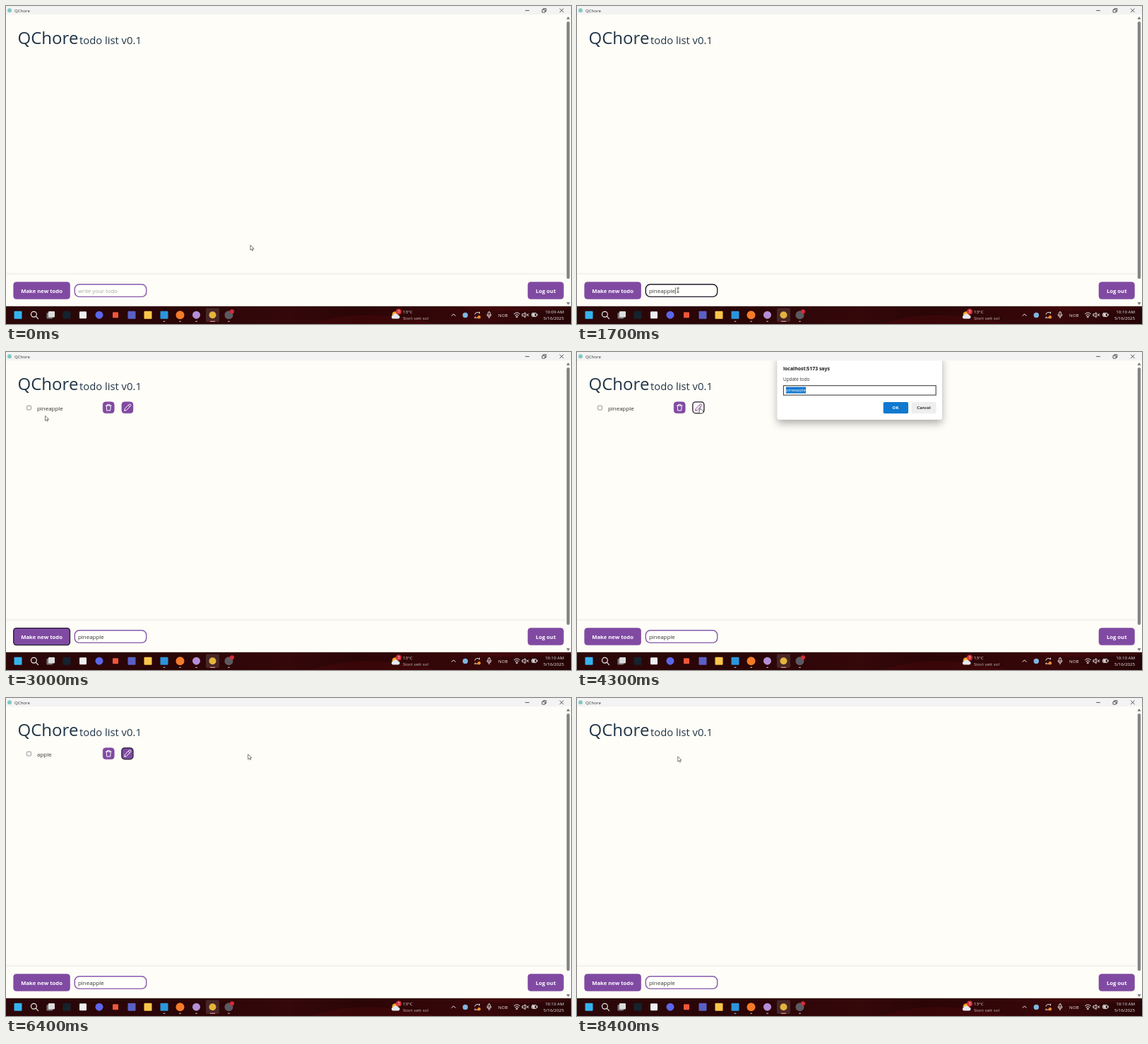
Animation of 800x451 px, one loop 8500 ms. Source, as an HTML page:

```html
<!DOCTYPE html>
<html lang="en">
<head>
<meta charset="utf-8">
<title>QChore</title>
<style>
html, body { margin: 0; width: 100%; height: 100%; overflow: hidden; background: #fefdf7; }
svg { display: block; width: 100%; height: 100%; }
text { font-family: "Open Sans", "Noto Sans", sans-serif; fill: #333; white-space: pre; }
.b { font-weight: 700; }
.mid { text-anchor: middle; }
.bar text { fill: #f2eaea; font-size: 6.15px; }
.end { text-anchor: end; }
.line { fill: none; stroke-linecap: round; stroke-linejoin: round; }
</style>
</head>
<body>
<svg viewBox="0 0 800 451">
  <defs>
    <linearGradient id="wall">
      <stop offset="0" stop-color="#2c0709"/>
      <stop offset=".3" stop-color="#2a0506"/>
      <stop offset=".5" stop-color="#35080a"/>
      <stop offset=".62" stop-color="#2b0506"/>
      <stop offset=".85" stop-color="#380709"/>
      <stop offset="1" stop-color="#240506"/>
    </linearGradient>
    <filter id="shade" x="-20%" y="-20%" width="140%" height="160%">
      <feDropShadow dx="0" dy="5" stdDeviation="6" flood-opacity=".32"/>
    </filter>
    <clipPath id="page"><rect y="12" width="800" height="414"/></clipPath>
  </defs>

  <rect width="800" height="451" fill="#fefdf7"/>

  <!-- page -->
  <text x="16.5" y="54.3" font-size="24" style="fill:#213547">QChore</text>
  <text x="104" y="54.3" font-size="14.8" style="fill:#213547">todo list v0.1</text>

  <g id="item">
    <rect id="box" x="29.6" y="76.2" width="5.8" height="5.8" rx="1" stroke-width=".8"/>
    <path id="tick" class="line" d="M31 79.2l1.2 1.3 2-2.7" stroke="#fff" stroke-width=".9"/>
    <text id="label" x="44" y="82.5" font-size="7.95"></text>
    <g id="trash">
      <rect x="137.2" y="70.8" width="16" height="16" rx="4"/>
      <path class="line" d="M141.3 76h7.8M143.6 76v-1.6h3.2v1.6M142.2 76l.5 7h5l.5-7" stroke-width="1"/>
    </g>
    <g id="edit">
      <rect x="163.9" y="70.8" width="16" height="16" rx="4"/>
      <path class="line" d="M167.8 83l.6-2.8 6-6q1.1-.7 2 .2t.2 2l-6 6zM173.2 75.4l2.2 2.2" stroke-width="1"/>
    </g>
  </g>

  <!-- footer -->
  <path d="M0 380.2h793" stroke="#eeede8" stroke-width="1.2"/>
  <path d="M0 379h793" stroke="#f8f7f1" stroke-width="1.4"/>
  <g id="make">
    <rect x="10.7" y="391.6" width="79.8" height="24" rx="4"/>
    <text class="b mid" x="50.6" y="406.6" font-size="7.7">Make new todo</text>
  </g>
  <g id="out">
    <rect x="739" y="391.6" width="50.4" height="24" rx="4"/>
    <text class="b mid" x="764.2" y="406.6" font-size="7.7">Log out</text>
  </g>
  <rect id="field" x="97.3" y="394.8" width="101.4" height="17.6" rx="6.5" fill="#fffffc" stroke-width="1.4"/>
  <text id="typed" x="102" y="406.6" font-size="7.95"></text>
  <path id="caret" stroke="#222" stroke-width=".7"/>

  <!-- scrollbar -->
  <rect x="792.5" y="12" width="7.5" height="414" fill="#fcfcf9"/>
  <rect x="793.8" y="22" width="4.4" height="365" rx="2.2" fill="#858585"/>
  <path d="M793.4 18.8l2.6-3.8 2.6 3.8zM793.4 420.2l2.6 3.8 2.6-3.8z" fill="#777"/>

  <!-- prompt -->
  <g id="prompt" clip-path="url(#page)">
    <rect x="283.7" y="4" width="233.2" height="92" rx="4" fill="#fff" filter="url(#shade)"/>
    <text class="b" x="292" y="26.2" font-size="6.9" style="fill:#1a1a1a">localhost:5173 says</text>
    <text x="292" y="41.2" font-size="6.4">Update todo</text>
    <rect x="292.4" y="47.7" width="215.8" height="13.4" fill="#fff" stroke="#444" stroke-width="1.1"/>
    <rect id="mark" x="295.8" y="49.6" width="28.2" height="9" fill="#1478d0"/>
    <text id="answer" x="296" y="56.4" font-size="6"></text>
    <path id="caret2" stroke="#111" stroke-width=".7"/>
    <rect x="433.7" y="71" width="35.4" height="16.3" rx="2" fill="#0f79cf"/>
    <text class="b mid" x="451" y="81.3" font-size="6" style="fill:#fff">OK</text>
    <rect x="473.5" y="71" width="35.2" height="16.3" rx="2" fill="#eeeeee"/>
    <text class="b mid" x="491" y="81.3" font-size="5.9">Cancel</text>
  </g>

  <!-- title bar -->
  <rect width="800" height="12.3" fill="#f3f3f3"/>
  <circle cx="5" cy="6.2" r="2.9" fill="#7fc8c4"/>
  <text x="12" y="8.7" font-size="6.1">QChore</text>
  <path class="line" d="M735.5 6.4h5M759.4 5.2h3.8v3.8h-3.8zM760.8 5v-1.4h4v4h-1.4M784.2 3.8l5 5M789.2 3.8l-5 5" stroke="#333" stroke-width=".8"/>

  <!-- taskbar -->
  <g class="bar">
    <rect y="425.8" width="800" height="25.2" fill="url(#wall)"/>
    <path d="M430 451q50-16 100-12t80 12zM640 426q70 12 160 3v-3z" fill="#5a0d10" opacity=".3"/>
    <rect x="283" y="428.6" width="19" height="19.4" rx="2" fill="#fff" opacity=".13"/>
    <g id="apps"></g>
    <g class="line" stroke="#eee" stroke-width="1.2">
      <circle cx="39.4" cy="437.2" r="3.9"/><path d="M42.3 440.2l3.2 3.4"/>
    </g>
    <rect x="57.5" y="435" width="8.5" height="8.5" rx="1" fill="#777"/>
    <rect x="60" y="433" width="9" height="8.6" rx="1" fill="#ddd"/>
    <circle cx="320" cy="433.3" r="3" fill="#d92b35"/>
    <rect x="288.8" y="446.7" width="7.4" height="1.3" rx=".6" fill="#e58a90"/>
    <path d="M222.7 447.3h2.6M245.3 447.3h2.6M268.2 447.3h2.6M314.2 447.3h2.6" stroke="#aaa" stroke-width="1.2"/>

    <circle cx="551" cy="437.6" r="4.4" fill="#f5a623"/>
    <path d="M547.5 443.4a2.6 2.6 0 0 1 .6-5 3.6 3.6 0 0 1 6.6.2 2.4 2.4 0 0 1 .8 4.8z" fill="#e4e9f2"/>
    <circle cx="556" cy="433.4" r="3.9" fill="#d4323b"/>
    <text class="mid" x="556" y="435.4" style="font-size:5.4px">3</text>
    <text x="562" y="436.3">13°C</text>
    <text x="562" y="444.6" style="fill:#cbbcbc">Stort sett sol</text>

    <circle cx="650.3" cy="438.4" r="3.7" fill="#7fb6e2"/>
    <g class="line" stroke="#eee" stroke-width="1">
      <path d="M631 439.4l2.6-2.6 2.6 2.6"/>
      <path d="M663.8 437.2a3.7 3.7 0 0 1 6.6-1.2v-2M670.6 439.4a3.7 3.7 0 0 1-6.6 1.4v2"/>
      <rect x="682.6" y="433.8" width="2.8" height="5" rx="1.4"/>
      <path d="M681 437.6a3 3 0 0 0 6 0M684 440.7v2"/>
      <path d="M719.4 436.6q4-3.6 8 0M720.9 438.6q2.5-2.2 5 0M722.4 440.4q1-.8 2 0v.8h-2z"/>
      <path d="M731.3 436.8h1.5l2.3-2.1v7l-2.3-2.1h-1.5zM737 436.6l2.8 3M739.8 436.6l-2.8 3"/>
      <rect x="744.6" y="435.6" width="6.6" height="4.8" rx="1"/>
      <path d="M752.2 437.2v1.6"/>
    </g>
    <circle cx="669.8" cy="441.2" r="2.3" fill="#f08a24"/>
    <rect x="745.4" y="436.4" width="3.4" height="3.2" fill="#eee"/>
    <text x="697" y="440.6">NOB</text>
    <text id="clock" class="end" x="790" y="436.4"></text>
    <text class="end" x="790" y="444.7">5/16/2025</text>
  </g>

  <!-- pointers, hot spot at 0,0 -->
  <g id="pointer">
    <path id="arrow" d="M0 0v7.2l1.7-1.5 1.1 2.4 1.2-.6-1.1-2.3h2.2z" fill="#fff" stroke="#444" stroke-width=".7"/>
    <path id="hand" d="M0 .6q.7-.9 1.3 0v3l3 .7q.9.3.8 1.4l-.6 3.3h-3.9l-2.2-3.2q.2-1 1.6.2z" fill="#fff" stroke="#444" stroke-width=".7" stroke-linejoin="round"/>
    <path id="beam" class="line" d="M-1.4-3h2.8M0-3v6M-1.4 3h2.8" stroke="#333" stroke-width=".8"/>
  </g>
</svg>

<script>
const LOOP = 8500, STEP = 100;
const PURPLE = '#804aa2', DARK = '#1f1b2a', PAPER = '#fffefa';
const $ = id => document.getElementById(id);
const show = (el, on) => el.setAttribute('visibility', on ? 'inherit' : 'hidden');
const between = (t, a, b) => t >= a && t < b;

// Plain taskbar tiles: centre, size, colour, round?
const apps = [
  [17, 11, '#35b3ee'], [86, 11, '#15232c'], [109, 10, '#eef0f2'],
  [132, 11, '#5b66ea', 1], [155, 8, '#f0563c'], [178, 11, '#5a60c4'],
  [201, 11, '#f8c64a'], [224, 11, '#2b95dc'], [246.5, 12, '#f47b2a', 1],
  [269.5, 11, '#b58fd6', 1], [292.5, 10, '#e3b53c', 1], [315.5, 12, '#5a5a60', 1]
];
$('apps').innerHTML = apps.map(([x, s, fill, round]) =>
  `<rect x="${x - s / 2}" y="${438.2 - s / 2}" width="${s}" height="${s}" rx="${round ? s / 2 : 1}" fill="${fill}"/>`
).join('');

// Pointer stops: time, x, y
const path = [
  [100, 346, 339], [700, 143, 403], [1800, 143, 403], [2200, 64, 404],
  [2500, 64, 404], [2900, 55.5, 90.3], [3100, 55.5, 90.3], [3500, 173.6, 78],
  [4400, 173.6, 78], [5000, 241.8, 68.2], [5600, 241.8, 68.2], [6000, 452, 80],
  [6200, 452, 80], [6800, 30.5, 79], [7500, 30.5, 79], [7900, 142.8, 83]
];

function pointerAt(t) {
  const i = path.findIndex(p => p[0] > t);
  if (i === 0) return path[0].slice(1);
  if (i < 0) return path[path.length - 1].slice(1);
  const [t0, x0, y0] = path[i - 1], [t1, x1, y1] = path[i];
  const u = (t - t0) / (t1 - t0), k = u * u * (3 - 2 * u);
  return [x0 + (x1 - x0) * k, y0 + (y1 - y0) * k];
}

function over(id, [x, y]) {
  const a = name => +$(id).getAttribute(name);
  return rectHit(a('x'), a('y'), a('width'), a('height'), x, y);
}
function rectHit(x, y, w, h, px, py) {
  return px >= x && px <= x + w && py >= y && py <= y + h;
}
function overButton(id, [x, y]) {
  const r = $(id).querySelector('rect');
  const [a, b, w, h] = ['x', 'y', 'width', 'height'].map(n => +r.getAttribute(n));
  return rectHit(a, b, w, h, x, y);
}

function button(id, hover, focus) {
  const [r, ink] = $(id).children;
  r.setAttribute('fill', hover ? PAPER : PURPLE);
  r.setAttribute('stroke', focus ? DARK : PURPLE);
  r.setAttribute('stroke-width', focus ? 1.3 : .6);
  const tone = hover ? PURPLE : '#fff';
  if (ink.tagName === 'text') ink.style.fill = tone;
  else ink.setAttribute('stroke', tone);
}

function typing(word, t, from, to) {
  const n = Math.floor((t - from) / (to - from) * word.length);
  return word.slice(0, Math.max(0, Math.min(word.length, n)));
}

function caret(id, textEl, y, h, on) {
  const x = +textEl.getAttribute('x') + (textEl.textContent ? textEl.getComputedTextLength() : 0) + .5;
  $(id).setAttribute('d', `M${x} ${y}v${h}`);
  show($(id), on);
}

function draw(t) {
  const pos = pointerAt(t);
  const asking = between(t, 3800, 6100);
  const listed = between(t, 2400, 8000);
  const checked = between(t, 6900, 7300);
  const focus = between(t, 800, 2300) ? 'field' : between(t, 2300, 3700) ? 'make'
    : between(t, 3700, 6900) ? 'edit' : '';

  // Footer
  const word = typing('pineapple', t, 900, 1700);
  const typed = $('typed');
  typed.textContent = word || (focus === 'field' ? 'write your todo' : t < 900 ? 'write your todo' : '');
  typed.style.fill = word ? '#333' : '#a3a3a3';
  typed.setAttribute('font-size', word ? 7.95 : 7.8);
  $('field').setAttribute('stroke', focus === 'field' ? DARK : '#8759ad');
  caret('caret', typed, 399.5, 9, focus === 'field' && word !== '');

  // List row
  show($('item'), listed);
  show($('tick'), listed && checked);
  $('label').textContent = t < 6100 ? 'pineapple' : 'apple';
  const nearBox = over('box', pos) || between(t, 6800, 7600);
  $('box').setAttribute('fill', checked ? '#1478d0' : '#fff');
  $('box').setAttribute('stroke', checked ? '#1478d0' : nearBox ? '#444' : '#777');

  // The row under the prompt keeps its hover state
  const hits = id => overButton(id, pos);
  button('make', hits('make'), focus === 'make');
  button('out', false, false);
  button('trash', !asking && hits('trash'), false);
  button('edit', asking || hits('edit'), focus === 'edit');

  // Prompt
  show($('prompt'), asking);
  const marked = t < 4700;
  const answer = $('answer');
  answer.textContent = marked ? 'pineapple' : typing('apple', t, 4600, 5400);
  answer.style.fill = marked ? '#fff' : '#222';
  show($('mark'), asking && marked);
  caret('caret2', answer, 50, 8.4, asking && !marked);

  $('clock').textContent = t < 900 ? '10:09 AM' : '10:10 AM';

  // Pointer
  const kind = asking ? (t < 5700 ? 'hand' : 'arrow')
    : over('field', pos) ? 'beam'
    : hits('make') || listed && (hits('edit') || hits('trash')) ? 'hand' : 'arrow';
  for (const id of ['arrow', 'hand', 'beam']) show($(id), id === kind);
  $('pointer').setAttribute('transform', `translate(${pos})`);
}

function tick(now) {
  draw(Math.floor(now % LOOP / STEP) * STEP);
  requestAnimationFrame(tick);
}
draw(0);
requestAnimationFrame(tick);
</script>
</body>
</html>
```
